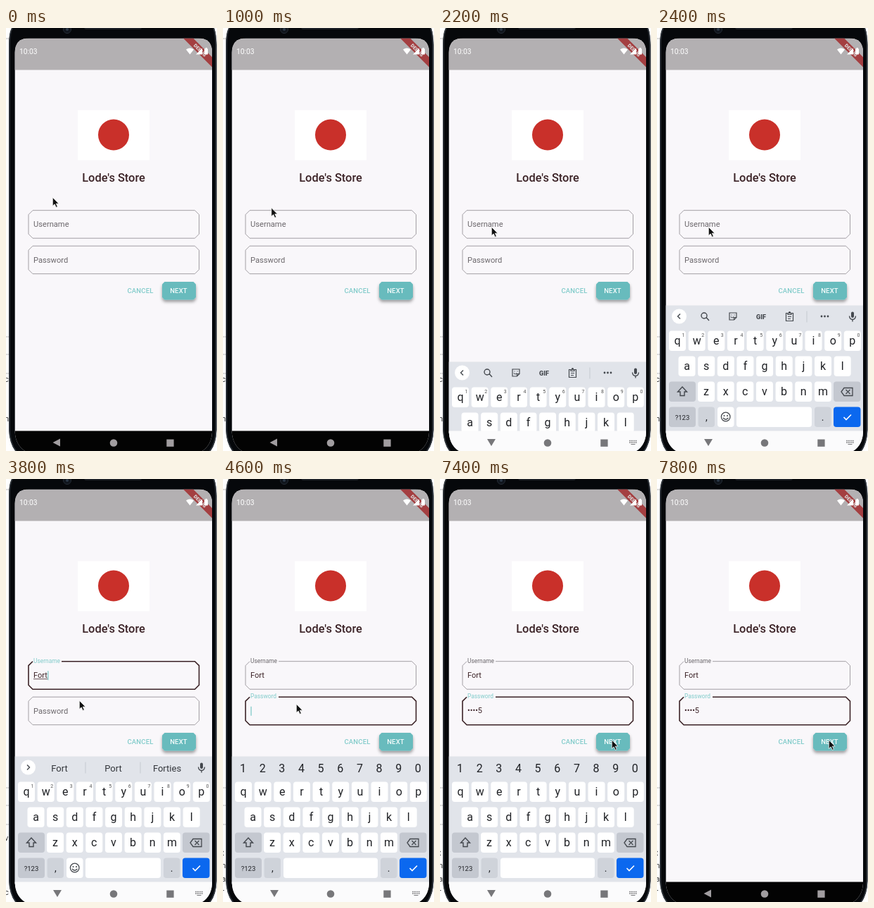
Recreate the animation shown at these times as an HTML page. Size 300x600 px, loop 8000 ms.

```html
<!DOCTYPE html>
<html lang="en">
<head>
<meta charset="utf-8">
<title>Store login</title>
<style>
html, body { margin: 0; width: 100%; height: 100%; overflow: hidden; background: #fff; }
svg { display: block; width: 300px; height: 600px; font-family: Roboto, sans-serif; }
</style>
</head>
<body>
<svg viewBox="0 0 300 600">
  <defs>
    <clipPath id="screen"><path d="M12.700 35Q13 15 33 15H273Q293 15 293 35V574Q292 593 278 601H28Q14 593 12.700 574Z"/></clipPath>
    <filter id="shadow" x="-20%" y="-30%" width="140%" height="190%">
      <feDropShadow dx="0" dy="3" stdDeviation="2.2" flood-opacity=".38"/>
    </filter>
  </defs>
  <path d="M0 15H4M0 438H4M0 463H4M0 490H4" stroke="#bbb"/>
  <g id="page"></g>
  <path d="M8 0Q4 8 4 24V570Q5 590 14 601H290Q299 590 299.500 570V24Q299 8 296 0Z" fill="#06080b"/>
  <path d="M9 0Q5 8 5 24V570Q6 590 15 601M289 601Q298 590 298.500 570V24Q298 8 295 0" fill="none" stroke="#2f353c" stroke-width="1.6"/>
  <circle cx="87" cy="2" r="5.5" fill="#10151c" stroke="#252c35"/>
  <circle cx="87" cy="2" r="2" fill="#2c3949"/>
  <rect x="111" y="-4" width="82" height="6" rx="3" fill="#1c2026"/>
  <g clip-path="url(#screen)" transform="translate(0 -.5)">
    <rect x="12" y="15" width="281" height="586" fill="#f9f7fa"/>
    <rect x="12" y="15" width="281" height="45" fill="#b3b0b2"/>
    <rect x="102" y="117" width="102" height="71" fill="#fff"/>
    <circle cx="153" cy="152" r="22" fill="#c9302a"/>
    <text x="153" y="218" text-anchor="middle" font-size="16.4" font-weight="500" fill="#3b2226">Lode's Store</text>
    <g id="fields"></g>
    <g font-size="9.5" font-weight="500" letter-spacing=".2" text-anchor="middle">
      <text x="191" y="376.5" fill="#80cbca">CANCEL</text>
      <path d="M225.500 360.500H266.500L270 364V382.500L266.500 386H225.500L222 382.500V364Z" fill="#68bbbd" filter="url(#shadow)"/>
      <text x="245.5" y="376.5" fill="#f4fbfb">NEXT</text>
    </g>
    <g transform="translate(293 15) rotate(45)">
      <rect x="-40" y="19" width="80" height="10" fill="#a43f41"/>
      <text y="26.5" font-size="7" font-weight="900" text-anchor="middle" fill="#ddd">DEBUG</text>
    </g>
    <g fill="#fff">
      <text x="19" y="37" font-size="10.3">10:03</text>
      <path d="M256 31Q261.500 27 267 31L261.500 38ZM270 38L279 29V38ZM282 30H283.500V28.500H286V30H287V38H282Z"/>
    </g>
    <g id="keyboard"></g>
    <g id="nav"></g>
  </g>
  <g id="pointer">
    <path transform="translate(.3 .3) scale(.94)" d="M0 0V13L3 10.200L5.300 15L7.500 14L5.300 9.400H9.300Z" fill="#111" stroke="#fff" stroke-width=".8"/>
  </g>
</svg>
<script>
const LOOP = 8000, STEP = 200;
const TEAL = '#80cbca', DARK = '#3b2226', INK = '#202226', ICON = '#44484e';
const USER = 'Fort', PIN = '12345';
const USER_KEYS = [2800, 3000, 3200, 3400], PIN_KEYS = [5000, 5200, 5600, 6200, 6600];
const USER_FOCUS = 2600, PIN_FOCUS = 4200;
const PATH = [[0, 66, 240], [600, 66, 240], [1600, 73, 282], [3200, 73, 282], [3800, 104, 314],
  [4200, 104, 319], [6400, 104, 319], [7200, 244, 370], [LOOP, 244, 370]];

const $ = id => document.getElementById(id);
const mix = (a, b, p) => a + (b - a) * p;
const ramp = (t, from, to) => {
  const p = Math.min(1, Math.max(0, (t - from) / (to - from)));
  return 1 - (1 - p) ** 2;
};
const text = (x, y, size, fill, s, extra = '') =>
  `<text x="${x}" y="${y}" font-size="${size}" fill="${fill}" ${extra}>${s}</text>`;
const centred = (x, y, size, fill, s, extra = '') => text(x, y, size, fill, s, 'text-anchor="middle" ' + extra);
const rect = (x, y, w, h, fill, r = 0) => `<rect x="${x}" y="${y}" width="${w}" height="${h}" rx="${r}" fill="${fill}"/>`;
const circle = (x, y, r, fill) => `<circle cx="${x}" cy="${y}" r="${r}" fill="${fill}"/>`;
const line = (d, stroke = ICON, width = 1.4, extra = '') =>
  `<path d="${d}" fill="none" stroke="${stroke}" stroke-width="${width}" ${extra}/>`;

const ruler = document.createElement('canvas').getContext('2d');
function textWidth(s) {
  ruler.font = '11px Roboto, sans-serif';
  return ruler.measureText(s).width;
}

function field(y, label, lift, focused, value, caret, underline) {
  const gap = mix(38, 79, lift);
  const border = `M${gap} ${y}H268.500L274.500 ${y + 6}V${y + 33.5}L268.500 ${y + 39.5}H38L32 ${y + 33.5}V${y + 6}L38 ${y}`;
  const end = 39.5 + textWidth(value);
  return line(border, focused ? DARK : '#99959a', focused ? 1.6 : .9)
    + text(39, mix(y + 23.5, y + 2, lift), mix(11.15, 8.4, lift), focused ? TEAL : '#6b676b', label)
    + text(39, y + 23, 11, DARK, value)
    + (underline ? line(`M39 ${y + 25}H${end}`, DARK, .8) : '')
    + (caret ? line(`M${end + .5} ${y + 13.5}V${y + 26.5}`, TEAL, 1.3) : '');
}

const typed = (t, keys) => keys.filter(k => k <= t).length;
const blink = (t, keys, focus) => (t - Math.max(focus, ...keys.filter(k => k <= t))) % 1000 < 600;

function fields(t) {
  const onUser = t >= USER_FOCUS && t < PIN_FOCUS, onPin = t >= PIN_FOCUS;
  const n = typed(t, PIN_KEYS);
  const fresh = t - PIN_KEYS[n - 1] < 1500;
  const secret = fresh ? '•'.repeat(n - 1) + PIN[n - 1] : '•'.repeat(n);
  return field(259.2, 'Username', ramp(t, USER_FOCUS - 100, USER_FOCUS + 200), onUser,
      USER.slice(0, typed(t, USER_KEYS)), onUser && blink(t, USER_KEYS, USER_FOCUS), onUser && t >= USER_KEYS[0])
    + field(309.7, 'Password', ramp(t, PIN_FOCUS - 100, PIN_FOCUS + 200), onPin,
      secret, onPin && t < 7600 && blink(t, PIN_KEYS, PIN_FOCUS));
}

const mic = rect(276, 403, 4, 8.5, ICON, 2) + line('M273.500 409Q274 414 278 414Q282 414 282.500 409M278 414V417');
const chevron = dir => circle(31.5, 409.5, 10.5, '#fff') + line(`M${31.5 - dir * 1.5} 406L${31.5 + dir * 2} 409.500L${31.5 - dir * 1.5} 413`);
const separator = x => line(`M${x} 402V418`, '#c5c9d0', 1);

function toolbar() {
  return chevron(-1) + mic + separator(213)
    + line('M70 411L74 415.500M71 408.500A4 4 0 1 1 63 408.500A4 4 0 1 1 71 408.500')
    + line('M103 404.500H113V411L109.500 414.500H103ZM113 411H109.500V414.500M105 410Q107 413 109 410M105.500 407.500H106.500M109.500 407.500H110.500', ICON, 1.2)
    + centred(148, 413, 9, ICON, 'GIF', 'font-weight="900"')
    + line('M183.500 405H193.500V416H183.500ZM186 405V407H191V405M186 410H191M186 413H190', ICON, 1.2)
    + circle(188.5, 404, 1.5, ICON)
    + [234, 238.5, 243].map(x => circle(x, 409.5, 1.4, ICON)).join('');
}

function suggestions(t) {
  const words = [USER.slice(0, typed(t, USER_KEYS)), 'Port', 'Forties'];
  return chevron(1) + mic + separator(113) + separator(191)
    + words.map((w, i) => centred(76 + i * 76.5, 415, 13, '#33363b', w)).join('');
}

function keyRow(letters, x0, y, hints) {
  return [...letters].map((c, i) => {
    const x = x0 + i * 27.65;
    return rect(x - 12, y - 14, 24, 28.5, '#fff', 4) + centred(x, y + 5, 16, INK, c)
      + (hints ? centred(x + 8.5, y - 6, 7, '#555', (i + 1) % 10) : '');
  }).join('');
}

function keyboard(t) {
  const numeric = t >= PIN_FOCUS + 200;
  const top = numeric
    ? [...'1234567890'].map((d, i) => centred(28.5 + i * 27.65, 416, 16, INK, d)).join('')
    : t >= USER_KEYS[0] ? suggestions(t) : toolbar();
  const grey = '#c4c8d0', pale = '#cfd3da';
  const spaceX = numeric ? 86 : 113;
  return rect(12, 394, 281, 180, '#e1e4ea') + top
    + keyRow('qwertyuiop', 29, 444, !numeric) + keyRow('asdfghjkl', 42.5, 480) + keyRow('zxcvbnm', 70, 516)
    + rect(17, 502, 38, 28.5, grey, 4) + line('M36 509.500L42.500 516.500H39V522H33V516.500H29.500Z')
    + rect(251, 502, 38.5, 28.5, grey, 4)
    + line('M262 516.500L266 511H278V522H266ZM268.500 513.500L274.500 519.500M274.500 513.500L268.500 519.500', ICON, 1.3)
    + rect(17, 538, 38, 28.5, grey, 4) + centred(36, 556, 9.5, INK, '?123')
    + rect(58.5, 538, 23.5, 28.5, pale, 4) + centred(70.5, 557, 14, INK, ',')
    + (numeric ? '' : rect(86, 538, 23.5, 28.5, '#fff', 4)
      + line('M104 552A6.300 6.300 0 1 1 91.400 552A6.300 6.300 0 1 1 104 552M94 553.500Q97.700 558 101.400 553.500', ICON, 1.3)
      + circle(95.5, 550.5, 1, ICON) + circle(100, 550.5, 1, ICON))
    + rect(spaceX, 538, 220 - spaceX, 28.5, '#fff', 4)
    + rect(224, 538, 23.5, 28.5, pale, 4) + centred(235.7, 557, 14, INK, '.')
    + rect(251, 538, 38.5, 28.5, '#0b68ef', 4) + line('M265.500 552.500L269 556L276 549', '#fff', 1.6);
}

function nav(t, open) {
  const fill = open ? '#77777a' : '#a19da0';
  const inputIcon = line('M269 586H280M269 588.500H280', fill, 1.5, 'stroke-dasharray="1.5 .8"')
    + line('M271.500 591H277.500', fill, 1.2);
  return rect(12, 572, 281, 30, open ? '#fbfbfc' : '#030303')
    + `<path d="${open ? 'M67 583.500H79L73 593.500Z' : 'M77 583V594L66.500 588.500Z'}" fill="${fill}"/>`
    + circle(153, 589, 5.3, fill) + rect(228.3, 584, 10.3, 10.3, fill)
    + (t >= 2000 && t < 7800 ? inputIcon : '');
}

function page(t) {
  const marks = t < 2800 ? [['c', 502], ['h', 558]]
    : t < 4400 ? [['v', 513], ['.', 532], ['c', 590]]
    : [['t', 534], ['n', 552], ['a', 571], ['r', 589]];
  return marks.map(([c, y]) => text(-2, y, 11, '#333', c)).join('');
}

function pointerAt(t) {
  const i = PATH.findIndex(p => p[0] > t);
  const [t0, x0, y0] = PATH[i - 1], [t1, x1, y1] = PATH[i];
  const p = (t - t0) / (t1 - t0), s = p * p * (3 - 2 * p);
  return `translate(${mix(x0, x1, s)} ${mix(y0, y1, s)})`;
}

let shown = -1;
function draw(now) {
  const t = Math.floor(now % LOOP / STEP) * STEP;
  if (t !== shown) {
    shown = t;
    const open = ramp(t, 2100, 2400) * (1 - ramp(t, 7500, 7800));
    $('page').innerHTML = page(t);
    $('fields').innerHTML = fields(t);
    $('keyboard').innerHTML = open ? keyboard(t) : '';
    $('keyboard').setAttribute('transform', `translate(0 ${(1 - open) * 180})`);
    $('nav').innerHTML = nav(t, open > 0);
    $('pointer').setAttribute('transform', pointerAt(t));
  }
  requestAnimationFrame(time => draw(Math.max(0, time - start)));
}
const start = performance.now();
draw(0);
</script>
</body>
</html>
```
